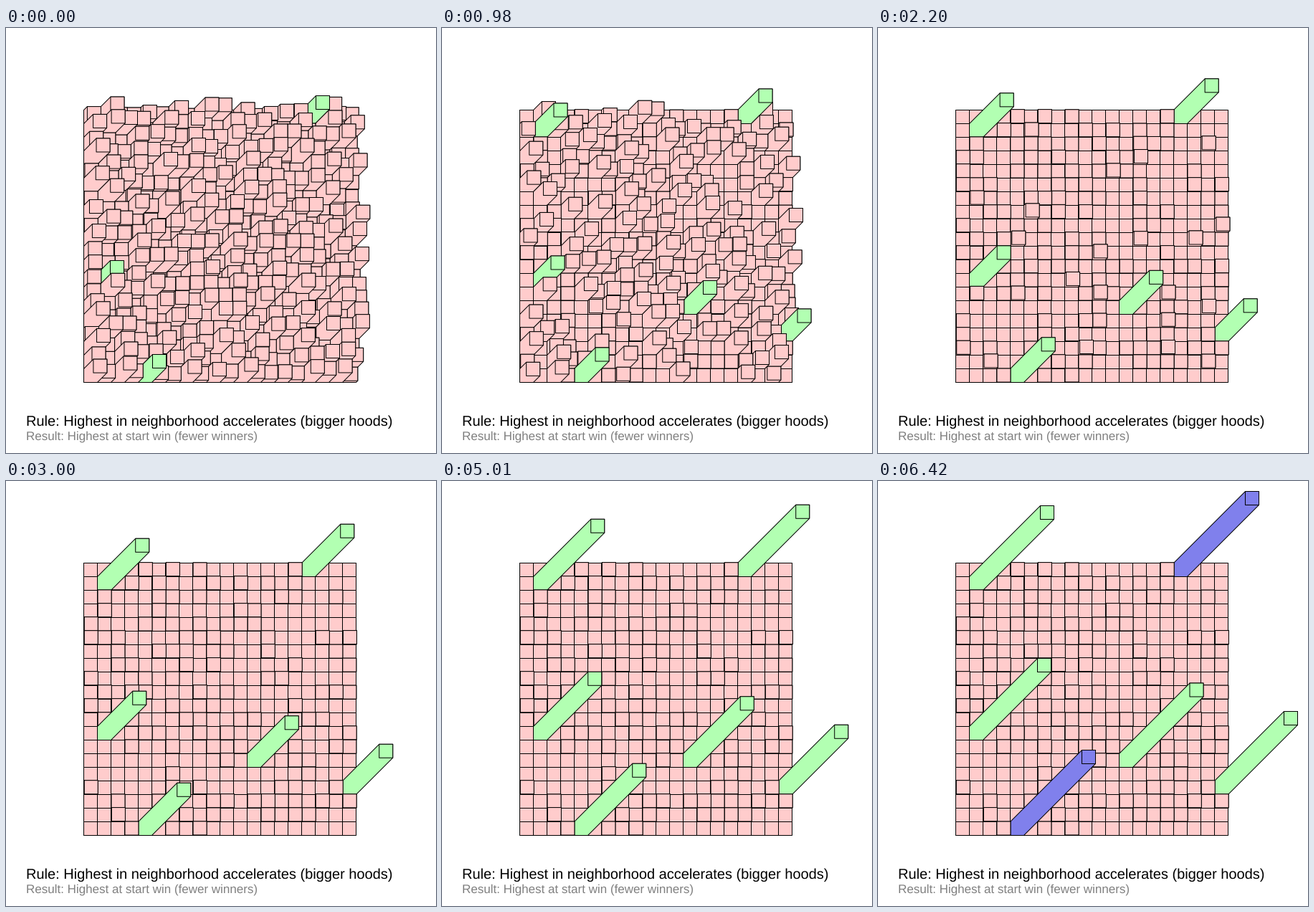
Write a matplotlib script that moves like this. It is 600 px wide and 593 px high and loops after 7.05 s.

```python
import numpy as np
import matplotlib.pyplot as plt
from matplotlib.animation import FuncAnimation
from matplotlib.collections import PolyCollection

W, H, DPI = 600, 593, 100
LOOP, STEP = 7050, 30
END, MOVES = 6420, 73  # the picture moves on in equal beats, then holds
N, CELL = 20, 19
LEFT, TOP = 108.5, 114.5
PINK, GREEN, BLUE = "#ffcccc", "#b2ffb2", "#8080ec"

plt.rcParams["text.hinting"] = "none"

# (column, row): lag behind the leader, time it turns green
WINNERS = {(16, 0): (0, 0), (4, 19): (0, 0), (1, 12): (5, 0),
           (1, 1): (1, 380), (12, 14): (1.5, 380), (19, 16): (3, 380)}

rng = np.random.default_rng(12)
start = rng.uniform(0, 19.5, (N, N))
for col, row in WINNERS:
    start[row, col] = 20
rest = np.where(rng.random((N, N)) < .3, rng.uniform(.3, .9, (N, N)), 0)

# The further below its highest neighbour, the more a column sinks at first
padded = np.pad(start, 1)
highest = np.max([padded[r:r + N, c:c + N] for r in range(3)
                  for c in range(3)], axis=0)
sink = np.minimum(1.5 * (highest - start), 6)


def leader(t):
    return np.interp(t, [0, 550, 1850, END], [20, 25, 39, 100])


def heights(t):
    early = min(t / 550, 1)
    h = start - sink * early - max(0, t - 550) * .0102
    h = np.maximum(h, rest)
    for (col, row), (lag, _) in WINNERS.items():
        h[row, col] = leader(t) - lag * (.4 + .6 * early)
    return h


# Painter's order: top row first, each row from right to left
rows, cols = np.divmod(np.arange(N * N), N)
cols = N - 1 - cols
base = np.stack([LEFT + cols * CELL, TOP + rows * CELL], axis=1)

# Each block is a hexagonal side outline and a square cap
TL, TR, BR, BL = (0, 0), (CELL, 0), (CELL, CELL), (0, CELL)
corners = np.array([[TL, TL, TR, BR, BR, BL], [TL, TR, BR, BL, BL, BL]])
lifted = np.array([[0, 1, 1, 1, 0, 0], [1] * 6])[..., None] * [1, -1]


def blocks(t):
    h = heights(t)[rows, cols]
    verts = base[:, None, None] + corners + h[:, None, None, None] * lifted
    return verts.reshape(-1, 6, 2)


def colour(cell, t):
    lag, since = WINNERS.get(cell, (0, LOOP))
    if t < since:
        return PINK
    return BLUE if leader(t) - lag >= 99.99 else GREEN


def colours(t):
    return [colour(cell, t) for cell in zip(cols, rows) for _ in range(2)]


fig = plt.figure(figsize=(W / DPI, H / DPI), dpi=DPI, facecolor="white")
ax = fig.add_axes([0, 0, 1, 1])
ax.set_xlim(0, W)
ax.set_ylim(H, 0)
ax.axis("off")

px = 72 / DPI
field = PolyCollection(blocks(0), facecolors=colours(0), edgecolors="black",
                       linewidths=px, snap=False)
ax.add_collection(field, autolim=False)


def label(y, text, size, color):
    ax.text(28, y, text, fontsize=size * px, color=color, va="baseline",
            family=["Liberation Sans", "DejaVu Sans"])


label(555, "Rule: Highest in neighborhood accelerates (bigger hoods)", 20,
      "black")
label(574, "Result: Highest at start win (fewer winners)", 17, "#808080")


def draw(i):
    beat = min(int((i * STEP + 25) * MOVES / END), MOVES)
    t = beat * END / MOVES
    field.set_verts(blocks(t))
    field.set_facecolor(colours(t))
    return [field]


anim = FuncAnimation(fig, draw, frames=LOOP // STEP, interval=STEP,
                     init_func=lambda: draw(0), repeat=True, repeat_delay=0,
                     cache_frame_data=False)
plt.show()
```
